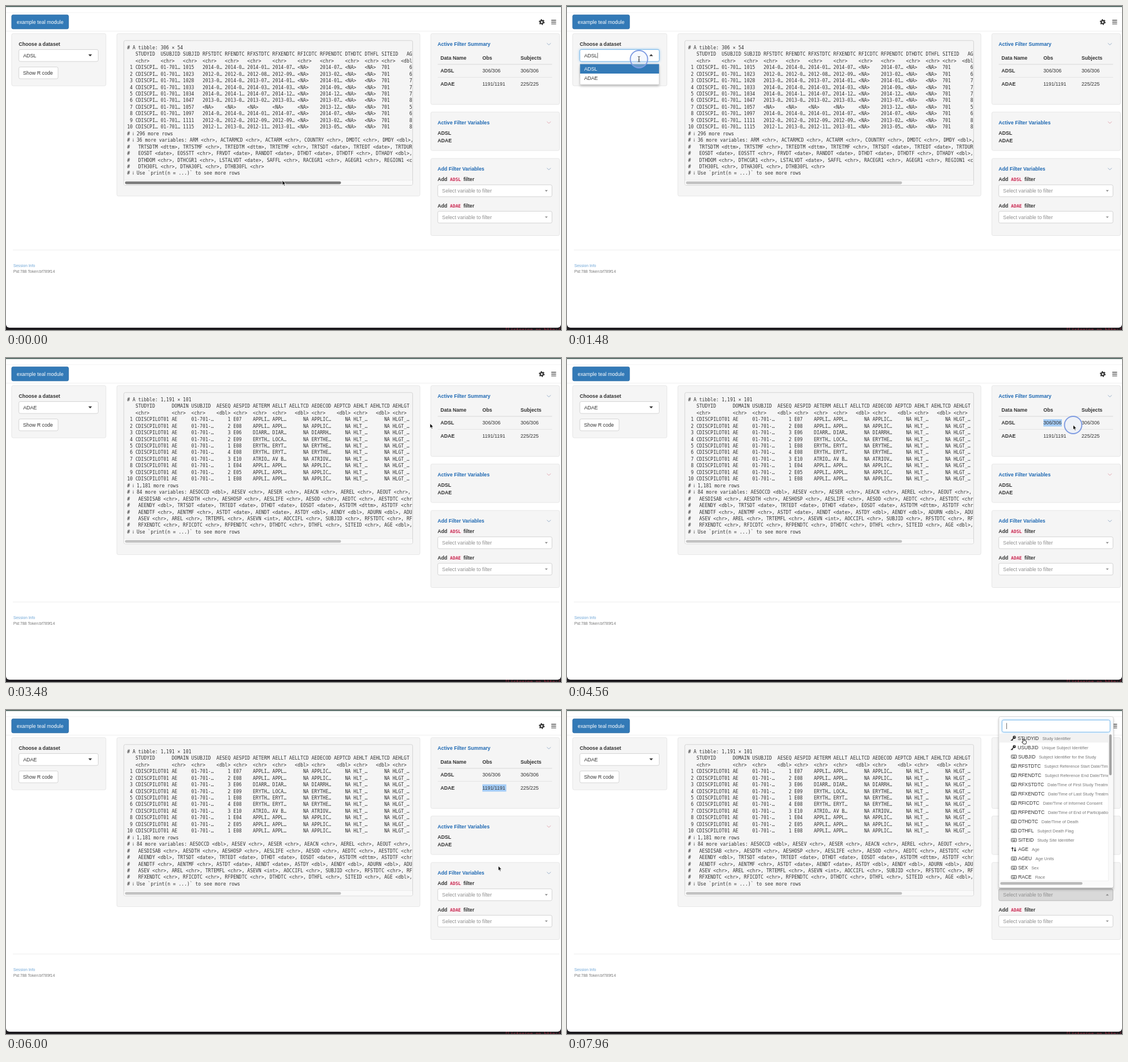
An HTML page that plays this animation: 960x561 px, repeating every 8 s.

```html
<!DOCTYPE html>
<html lang="en">
<head>
<meta charset="utf-8">
<title>Dataset viewer</title>
<style>
  html, body { margin: 0; width: 100%; height: 100%; overflow: hidden; background: #fff; }
  svg { display: block; width: 960px; height: 561px; }
  text { font-family: "Liberation Sans", Arial, sans-serif; fill: #333; white-space: pre; }
  .mono { font-family: "DejaVu Sans Mono", monospace; }
  .bold { font-weight: 700; }
</style>
</head>
<body>
<script>
const LOOP = 8000;
const BLUE = '#337ab7';
const NS = 'http://www.w3.org/2000/svg';

function add(parent, tag, attrs = {}, content) {
  const el = document.createElementNS(NS, tag);
  for (const k in attrs) el.setAttribute(k, attrs[k]);
  if (content !== undefined) el.textContent = content;
  parent.append(el);
  return el;
}
const group = (parent, attrs) => add(parent, 'g', attrs);
const path = (parent, d, attrs) => add(parent, 'path', { d, fill: 'none', ...attrs });
const rect = (parent, x1, y1, x2, y2, fill, attrs) =>
  add(parent, 'rect', { x: x1, y: y1, width: x2 - x1, height: y2 - y1, fill, ...attrs });
const box = (parent, x1, y1, x2, y2, fill, stroke, attrs) =>
  rect(parent, x1, y1, x2, y2, fill, { stroke, rx: 2.5, 'stroke-width': .8, ...attrs });
// y is the middle of the capitals
const label = (parent, x, y, str, attrs = {}) => {
  const size = attrs['font-size'] || 8.66;
  return add(parent, 'text', { x, y: y + size * .36, 'font-size': size, ...attrs }, str);
};
const bold = (parent, x, y, str, attrs) => label(parent, x, y, str, { class: 'bold', ...attrs });
const show = (el, on) => el.setAttribute('visibility', on ? 'visible' : 'hidden');
const triangle = (parent, x, y, w, h, fill) =>
  path(parent, `M${x - w} ${y - h / 2}h${2 * w}l${-w} ${h}z`, { fill });

const svg = add(document.body, 'svg', { viewBox: '0 0 960 561' });
const defs = add(svg, 'defs');
rect(add(defs, 'clipPath', { id: 'output' }), 204, 60, 703, 400);
rect(add(defs, 'clipPath', { id: 'list' }), 747, 40, 936, 296);
const soft = add(defs, 'filter', { id: 'soft', x: '-20%', y: '-20%', width: '140%', height: '150%' });
add(soft, 'feGaussianBlur', { stdDeviation: 2.2 });

// Window frame
rect(svg, 0, 0, 960, 561, '#1d1b1f');
label(svg, 863, 561.5, '[Listening on http://127.0.0.1', { class: 'mono', 'font-size': 8, style: 'fill:#9c2c40' });
rect(svg, 0, -10, 960, 557, '#fff', { rx: 6 });
rect(svg, 0, 0, 960, 1.7, '#48605a');
rect(svg, 0, 11, 960, 11.6, '#ededed');
rect(svg, 0, 43, 960, 43.7, '#e9e9e9');
rect(svg, 12, 422, 957, 422.7, '#e6e6e6');
label(svg, 12.7, 449.8, 'Session Info', { 'font-size': 6.85, style: 'fill:#6fa6d6' });
label(svg, 12.7, 459.6, 'Pid:788 Token:bf789f14', { 'font-size': 6.85, style: 'fill:#777' });

// Header
box(svg, 9.8, 15.3, 108.2, 39.7, BLUE, '#2e6da4');
label(svg, 18.6, 27.8, 'example teal module', { 'font-size': 8.75, style: 'fill:#fff' });
add(svg, 'circle', { cx: 926.7, cy: 27.8, r: 2.7, fill: 'none', stroke: '#333', 'stroke-width': 2.1 });
add(svg, 'circle', { cx: 926.7, cy: 27.8, r: 4.3, fill: 'none', stroke: '#333', 'stroke-width': 1.6, 'stroke-dasharray': '2 2.5' });
path(svg, 'M943.2 24.6h8.3m-8.3 3.2h8.3m-8.3 3.2h8.3', { stroke: '#333', 'stroke-width': 1.2 });

// Left panel
const panel = (x1, y1, x2, y2) => box(svg, x1, y1, x2, y2, '#f5f5f5', '#e3e3e3');
panel(9.8, 47.8, 172.8, 138.2);
bold(svg, 22, 65.8, 'Choose a dataset');
const glow = box(svg, 22.2, 75.4, 159.5, 96, '#66afe9', '#66afe9', { filter: 'url(#soft)', opacity: .8 });
const picker = box(svg, 22.2, 75.4, 159.5, 96, '#fff', '#ccc');
const picked = label(svg, 29.8, 85.6, 'ADSL');
const pickCaret = rect(svg, 52.6, 81, 53.3, 90.5, '#333');
const arrowDown = triangle(svg, 145.6, 85.5, 3.2, 3.5, '#333');
const arrowUp = triangle(svg, 145.6, 85, 3.2, -3.5, '#333');
const button = box(svg, 22.2, 105.6, 90, 126, '#fff', '#ccc');
label(svg, 29.6, 115.9, 'Show R code');

// Printed tables
const pad = (s, w, right) => right ? s.padStart(w) : s.padEnd(w);
function tibble(spec, rows) {
  const cols = spec.split(' ').map(c => c.split(':'));
  const line = (head, cell) => head + ' ' + cols.map(([name, w, type], i) =>
    pad(cell(name, i, type), +w, type === 'dbl')).join(' ');
  return [
    line('  ', name => name),
    line('  ', (name, i, type) => `<${type}>`),
    ...rows.map((r, n) => line(String(n + 1).padStart(2), (name, i) => r[i])),
  ];
}

const NA = '<NA>';
const cut = (s, w) => s === NA ? s : s.slice(0, w - 1) + '…';
const adslRows = `1015 2014-01 2014-07 2014-07 63
1023 2012-08 2012-09 2013-02 64
1028 2013-07 2014-01 2014-01 71
1033 2014-03 2014-03 2014-09 74
1034 2014-07 2014-12 2014-12 77
1047 2013-02 2013-03 2013-07 85
1057 <NA> <NA> 2013-12 59
1097 2014-01 2014-07 2014-07 68
1111 2012-09 2012-09 2013-02 81
1115 2012-11 2013-01 2013-05 84`.split('\n').map(row => {
  const [id, from, to, last, age] = row.split(' ');
  return ['CDISCPI…', '01-701…', id, cut(from, 7), cut(to, 7), cut(from, 8), cut(to, 8),
    NA, cut(last, 8), NA, NA, '701', age];
});
const adaeRows = `1 E07 APPLICATION
2 E08 APPLICATION
3 E06 DIARRHOEA
2 E09 ERYTHEMA LOCAL
1 E08 ERYTHEMA
4 E08 ERYTHEMA
3 E10 ATRIOVENTR AV_BLOCK
1 E04 APPLICATION
2 E05 APPLICATION
1 E08 APPLICATION`.split('\n').map(row => {
  const [seq, id, term, low = term] = row.split(' ');
  return ['CDISCPILOT01', 'AE', '01-701-…', seq, id, cut(term, 6), cut(low.replace('_', ' '), 5),
    'NA', cut(term, 7), 'NA', 'HLT_…', 'NA', 'HLGT_…'];
});

const hint = '# ℹ Use `print(n = ...)` to see more rows';
const adsl = ['# A tibble: 306 × 54',
  ...tibble('STUDYID:8:chr USUBJID:7:chr SUBJID:6:chr RFSTDTC:7:chr RFENDTC:7:chr RFXSTDTC:8:chr RFXENDTC:8:chr ' +
    'RFICDTC:7:chr RFPENDTC:8:chr DTHDTC:6:chr DTHFL:5:chr SITEID:6:chr AGE:5:dbl', adslRows),
  '# ℹ 296 more rows',
  '# ℹ 36 more variables: ARM <chr>, ACTARMCD <chr>, ACTARM <chr>, COUNTRY <chr>, DMDTC <chr>, DMDY <dbl>,',
  '#   TRTSDTM <dttm>, TRTSTMF <chr>, TRTEDTM <dttm>, TRTETMF <chr>, TRTSDT <date>, TRTEDT <date>, TRTDURD <dbl>,',
  '#   EOSDT <date>, EOSSTT <chr>, FRVDT <date>, RANDDT <date>, DTHDT <date>, DTHDTF <chr>, DTHADY <dbl>,',
  '#   DTHDOM <chr>, DTHCGR1 <chr>, LSTALVDT <date>, SAFFL <chr>, RACEGR1 <chr>, AGEGR1 <chr>, REGION1 <chr>,',
  '#   DTH30FL <chr>, DTHA30FL <chr>, DTHB30FL <chr>', hint];
const adae = ['# A tibble: 1,191 × 101',
  ...tibble('STUDYID:12:chr DOMAIN:6:chr USUBJID:8:chr AESEQ:5:dbl AESPID:6:chr AETERM:6:chr AELLT:5:chr ' +
    'AELLTCD:7:dbl AEDECOD:7:chr AEPTCD:6:dbl AEHLT:5:chr AEHLTCD:7:dbl AEHLGT:6:chr', adaeRows),
  '# ℹ 1,181 more rows',
  '# ℹ 84 more variables: AESOCCD <dbl>, AESEV <chr>, AESER <chr>, AEACN <chr>, AEREL <chr>, AEOUT <chr>,',
  '#   AESDISAB <chr>, AESDTH <chr>, AESHOSP <chr>, AESLIFE <chr>, AESOD <chr>, AEDTC <chr>, AESTDTC <chr>,',
  '#   AEENDY <dbl>, TRTSDT <date>, TRTEDT <date>, DTHDT <date>, EOSDT <date>, ASTDTM <dttm>, ASTDTF <chr>,',
  '#   AENDTF <chr>, AENTMF <chr>, ASTDT <date>, AENDT <date>, ASTDY <dbl>, AENDY <dbl>, ADURN <dbl>, ADURU <chr>,',
  '#   ASEV <chr>, AREL <chr>, TRTEMFL <chr>, ASEVN <int>, AOCCIFL <chr>, SUBJID <chr>, RFSTDTC <chr>, RFENDTC <chr>,',
  '#   RFXENDTC <chr>, RFICDTC <chr>, RFPENDTC <chr>, DTHDTC <chr>, DTHFL <chr>, SITEID <chr>, AGE <dbl>,', hint];

function output(lines) {
  const g = group(svg);
  const end = 72 + 11.45 * lines.length;
  box(g, 191.8, 47.8, 716, end + 28, '#f5f5f5', '#e3e3e3');
  box(g, 203.8, 59.8, 703.4, end + 9.4, '#f5f5f5', '#ccc');
  rect(g, 204.2, end + .2, 703, end + 9, '#fafafa', { rx: 2 });
  rect(g, 204.2, end, 703, end + .6, '#e6e6e6');
  const thumb = rect(g, 205.8, end + 2.8, 579.5, end + 7.4, '#c1c1c1', { rx: 2.3 });
  const text = group(g, { 'clip-path': 'url(#output)' });
  lines.forEach((s, i) => label(text, 209.4, 72 + 11.45 * i, s, { class: 'mono', 'font-size': 8.04 }));
  return { g, thumb };
}
const adslOut = output(adsl);
const adaeOut = output(adae);

// Dataset menu
const menu = group(svg);
rect(menu, 22.5, 103, 159.5, 139, '#000', { opacity: .22, filter: 'url(#soft)' });
box(menu, 22.4, 100.2, 159.4, 136, '#fff', '#d0d0d0', { rx: 1.5 });
rect(menu, 22.6, 100.6, 159.2, 117, BLUE);
label(menu, 29.8, 109, 'ADSL', { style: 'fill:#fff' });
label(menu, 29.8, 125.2, 'ADAE');

// Filter panels
function filterPanel(y1, y2, title, chevron = '#9db4cc') {
  panel(734.8, y1, 957.4, y2);
  bold(svg, 746.5, y1 + 18, title, { style: 'fill:#1f69b3' });
  path(svg, `M935.6 ${y1 + 16.6}l3.4 3 3.4-3`, { stroke: chevron, 'stroke-width': 1 });
}
filterPanel(47.8, 170.4, 'Active Filter Summary');
const picks = [112.3, 135].map(y => rect(svg, 824, y - 6.3, 824, y + 6.3, '#a5cdf7'));
['Data Name', 'Obs', 'Subjects'].forEach((s, i) => bold(svg, [751.5, 824, 890][i], 89.4, s));
rect(svg, 746.8, 100.4, 944.5, 101.6, '#ddd');
rect(svg, 746.8, 123.2, 944.5, 123.9, '#ddd');
[['ADSL', '306/306', '306/306'], ['ADAE', '1191/1191', '225/225']].forEach(([name, obs, subj], i) => {
  const y = [112.3, 135][i];
  bold(svg, 751.5, y, name);
  label(svg, 824, y, obs);
  label(svg, 890, y, subj);
});

filterPanel(183.6, 250.2, 'Active Filter Variables', '#e5aab4');
bold(svg, 746.5, 220.2, 'ADSL');
bold(svg, 746.5, 232.6, 'ADAE');

filterPanel(264, 397.5, 'Add Filter Variables');
const selects = ['ADSL', 'ADAE'].map((name, i) => {
  const y = 300.3 + 45.7 * i;
  bold(svg, 746.5, y, 'Add');
  rect(svg, 765.5, y - 5.5, 789.5, y + 5.5, '#f9f2f4', { rx: 2 });
  label(svg, 768, y, name, { class: 'mono bold', 'font-size': 7.8, style: 'fill:#c7254e' });
  bold(svg, 791.3, y, 'filter');
  const frame = box(svg, 746.8, y + 9.4, 944.4, y + 29.8, '#fff', '#ccc');
  label(svg, 754.3, y + 19.8, 'Select variable to filter', { 'font-size': 8.75, style: 'fill:#8f8f8f' });
  return { frame, down: triangle(svg, 934.6, y + 19.8, 2.5, 2.6, '#888'), up: triangle(svg, 934.6, y + 19.6, 2.5, -2.6, '#888') };
});

// Variable list
const list = group(svg);
rect(list, 747, 15, 945, 311, '#000', { opacity: .25, filter: 'url(#soft)' });
box(list, 747, 11.5, 945, 307.8, '#fff', '#ccc');
const searchGlow = box(list, 752.6, 17.4, 939.2, 38.2, '#66afe9', '#66afe9', { filter: 'url(#soft)', opacity: .6 });
const search = box(list, 752.6, 17.4, 939.2, 38.2, '#fff', '#ccc');
rect(list, 760.2, 22.5, 760.9, 33, '#333');
const hover = rect(list, 747.6, 41, 936, 56.4, '#f2f2f2');
rect(list, 936.2, 41, 944.4, 303.8, '#fafafa');
rect(list, 747.6, 296, 944.4, 304, '#fafafa');
path(list, 'M936.4 41V296H747.6', { stroke: '#e6e6e6', 'stroke-width': .6 });
rect(list, 937.8, 42.3, 942.2, 113, '#a3a3a3', { rx: 2.2 });
rect(list, 749.4, 297.9, 891.6, 302.4, '#b9b9b9', { rx: 2.2 });

const icons = {
  key(g, y) {
    add(g, 'circle', { cx: 773.8, cy: y - 1.4, r: 2, fill: '#333', stroke: '#333', 'stroke-width': 1.4 });
    add(g, 'circle', { cx: 774.4, cy: y - 2, r: .7, fill: '#fff' });
    path(g, `M772.6 ${y}l-3.6 3.6h2.2`, { stroke: '#333', 'stroke-width': 1.6 });
  },
  board(g, y) {
    rect(g, 768.5, y - 2.8, 777.5, y + 2.8, '#fff', { rx: .8, stroke: '#444', 'stroke-width': .9 });
    path(g, `M770 ${y - 1.1}h6M770 ${y + .3}h6`, { stroke: '#444', 'stroke-width': .8, 'stroke-dasharray': '.9 .5' });
    path(g, `M771 ${y + 1.6}h4`, { stroke: '#444', 'stroke-width': .8 });
  },
  sort(g, y) {
    path(g, `M770.6 ${y + 3.4}v-6.4m-1.7 1.9l1.7-2 1.7 2M775 ${y - 3.4}v6.4m-1.7-1.9l1.7 2 1.7-2`, { stroke: '#333', 'stroke-width': 1.2 });
  },
};
const rows = group(list, { 'clip-path': 'url(#list)' });
`STUDYID|Study Identifier|key
USUBJID|Unique Subject Identifier|key
SUBJID|Subject Identifier for the Study
RFSTDTC|Subject Reference Start Date/Time
RFENDTC|Subject Reference End Date/Time
RFXSTDTC|Date/Time of First Study Treatment
RFXENDTC|Date/Time of Last Study Treatment
RFICDTC|Date/Time of Informed Consent
RFPENDTC|Date/Time of End of Participation
DTHDTC|Date/Time of Death
DTHFL|Subject Death Flag
SITEID|Study Site Identifier
AGE|Age|sort
AGEU|Age Units
SEX|Sex
RACE|Race`.split('\n').forEach((row, i) => {
  const [name, about, icon = 'board'] = row.split('|');
  const y = 48.7 + 16.04 * i;
  icons[icon](rows, y);
  const t = label(rows, icon === 'key' ? 779.4 : 780.4, y, name, { 'font-size': 8.4 });
  add(t, 'tspan', { dx: 6, 'font-size': 7.4, style: 'fill:#777' }, about);
});

// Pointer
const ring = add(svg, 'circle', { fill: '#dfe8fb', 'fill-opacity': .3, stroke: '#7f9ce2', 'stroke-width': 1.9 });
const pointer = group(svg);
const outline = { stroke: '#fff', 'stroke-width': .8, 'stroke-linejoin': 'round' };
const shapes = {
  arrow: path(pointer, 'M0 0V8.2L1.9 6.5 3.2 9.4 4.6 8.8 3.3 5.9H5.9Z', { fill: '#000', ...outline }),
  beam: path(pointer, 'M-1.8-4.6Q0-4.6 0-3.4Q0-4.6 1.8-4.6M0-3.4V3.4M-1.8 4.6Q0 4.6 0 3.4Q0 4.6 1.8 4.6M-1 1.4H1', { stroke: '#222', 'stroke-width': .9 }),
  hand: path(pointer, 'M-.8 1.2Q0 0 .9 1.2V4Q1.7 3.3 2.4 4.2Q3.2 3.6 3.8 4.6Q5 4.2 5 5.6V7.4L4.2 10H.3L-2.6 6.6Q-2.4 5.4-.8 6.6Z', { fill: '#fff', stroke: '#111', 'stroke-width': .9 }),
};

// time, x, y
const track = [
  [0, 478, 302], [160, 478, 302], [1120, 124.5, 92], [1580, 124.5, 92], [1860, 62, 125], [2020, 62, 125],
  [2380, 77, 123], [2760, 77, 123], [3680, 823, 112], [4060, 823, 112], [4480, 875.5, 116], [4660, 875.5, 116],
  [4920, 823, 135], [5020, 823, 135], [5400, 868, 136], [5520, 868, 136], [5960, 851.5, 270], [6060, 851.5, 270],
  [6440, 840.2, 320.5], [6880, 840.2, 320.5], [7640, 789.5, 49], [LOOP, 789.5, 49],
];
const kinds = [[0, 'arrow'], [1040, 'beam'], [1680, 'hand'], [2840, 'arrow'], [3600, 'beam'], [4300, 'arrow'],
  [4840, 'beam'], [5560, 'arrow'], [6340, 'hand']];
const presses = [[1380, 1560], [1900, 2000], [2440, 2600], [4060, 4620], [5020, 5480], [6460, 6700]];

const clamp = (v, lo, hi) => Math.min(hi, Math.max(lo, v));
const between = (t, a, b) => t >= a && t < b;

function position(t) {
  const i = track.findIndex(k => k[0] > t);
  const [t0, x0, y0] = track[i - 1], [t1, x1, y1] = track[i];
  const u = (t - t0) / (t1 - t0), e = u * u * (3 - 2 * u);
  return [x0 + (x1 - x0) * e, y0 + (y1 - y0) * e];
}

function render(t) {
  const [x, y] = position(t);
  const kind = kinds.filter(k => k[0] <= t).pop()[1];
  pointer.setAttribute('transform', `translate(${x} ${y})`);
  for (const k in shapes) show(shapes[k], k === kind);

  const strength = Math.max(0, ...presses.map(([a, b]) => clamp(Math.min((t - a) / 80, 1 - (t - b) / 140), 0, 1)));
  ring.setAttribute('cx', x);
  ring.setAttribute('cy', y);
  ring.setAttribute('r', 9 + 6 * strength);
  ring.setAttribute('opacity', strength);

  const open = between(t, 1400, 1960), focused = between(t, 1400, 2640), second = t >= 1960;
  show(menu, open);
  show(pickCaret, open);
  show(arrowUp, open);
  show(arrowDown, !open);
  show(glow, focused);
  picker.setAttribute('stroke', focused ? '#66afe9' : '#ccc');
  picked.textContent = second ? 'ADAE' : 'ADSL';
  show(adslOut.g, !second);
  show(adaeOut.g, second);
  adslOut.thumb.setAttribute('fill', t < 240 ? '#7d7d7d' : '#c1c1c1');

  const over = between(t, 2240, 2840);
  button.setAttribute('fill', over ? '#dcdcdc' : '#fff');
  button.setAttribute('stroke', over ? '#8c8c8c' : '#ccc');
  button.setAttribute('stroke-dasharray', over ? '1.5 .8' : 'none');

  const wide = [between(t, 4060, 5020) ? 32 : 0, between(t, 5020, 6460) ? 41.4 : 0];
  picks.forEach((p, i) => {
    const drag = t < [4480, 5400][i] ? x - 823 : wide[i];
    p.setAttribute('width', clamp(Math.round(drag / 4.6) * 4.6, 0, wide[i]));
  });

  const listed = t >= 6620, searching = t >= 6800;
  show(list, listed);
  show(searchGlow, listed && searching);
  show(hover, t >= 7520);
  search.setAttribute('stroke', searching ? '#66afe9' : '#ccc');
  const { frame, up, down } = selects[0];
  frame.setAttribute('fill', listed ? '#d9d9d9' : t >= 6320 ? '#e6e6e6' : '#fff');
  frame.setAttribute('stroke', t >= 6320 ? '#adadad' : '#ccc');
  show(up, listed);
  show(down, !listed);
  show(selects[1].up, false);
}

const start = performance.now();
function tick() {
  render((performance.now() - start) % LOOP);
  requestAnimationFrame(tick);
}
tick();
</script>
</body>
</html>
```
